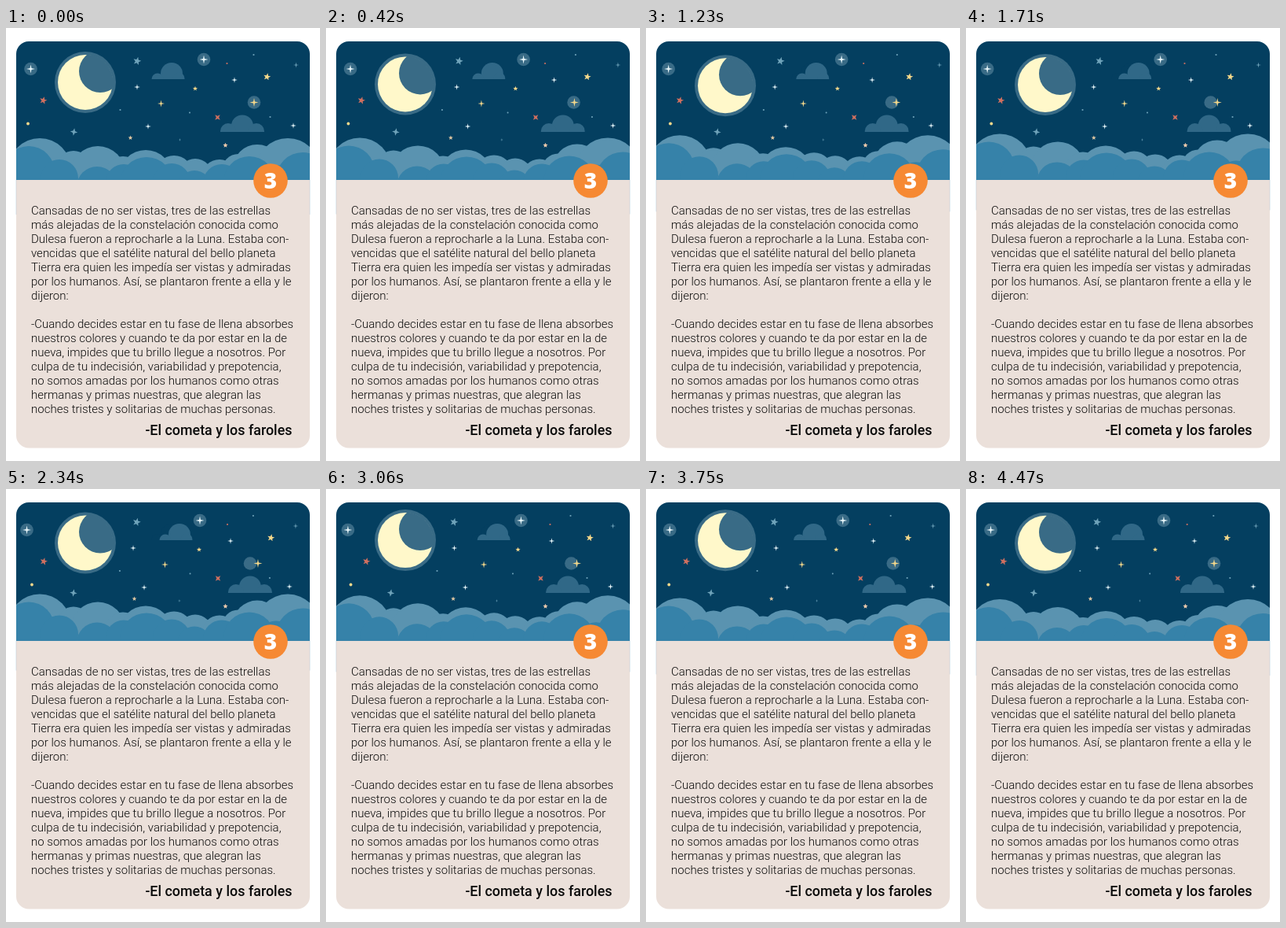
Recreate the animation shown at these times as an HTML page with a canvas. Size 400 by 550 pixels, loop 4.5 s.

```html
<!DOCTYPE html>
<html lang="es">
<head>
<meta charset="utf-8">
<style>
html, body { margin: 0; width: 100%; height: 100%; overflow: hidden; background: #fff; }
canvas { display: block; }
</style>
</head>
<body>
<canvas id="stage" width="400" height="550"></canvas>
<script>
const ctx = document.getElementById('stage').getContext('2d');
const LOOP = 4500, STEP = 30;
const SKY = '#043f60', PAPER = '#ebe0da', HALO = '#396b86', CLOUD = '#306887';
const BACK = '#5a93b0', FRONT = '#3682a9';
const WHITE = '#e4f4f8', GOLD = '#f6d98b', BLUE = '#6fa3ba', RED = '#cf6f5f';

const lines = [
  'Cansadas de no ser vistas, tres de las estrellas',
  'más alejadas de la constelación conocida como',
  'Dulesa fueron a reprocharle a la Luna. Estaba con-',
  'vencidas que el satélite natural del bello planeta',
  'Tierra era quien les impedía ser vistas y admiradas',
  'por los humanos. Así, se plantaron frente a ella y le',
  'dijeron:',
  '',
  '-Cuando decides estar en tu fase de llena absorbes',
  'nuestros colores y cuando te da por estar en la de',
  'nueva, impides que tu brillo llegue a nosotros. Por',
  'culpa de tu indecisión, variabilidad y prepotencia,',
  'no somos amadas por los humanos como otras',
  'hermanas y primas nuestras, que alegran las',
  'noches tristes y solitarias de muchas personas.'
];

function disc(x, y, r, color) {
  ctx.fillStyle = color;
  ctx.beginPath();
  ctx.arc(x, y, r, 0, Math.PI * 2);
  ctx.fill();
}

function star(x, y, r, color, points = 4, inner = 0.25, turn = 0) {
  ctx.fillStyle = color;
  ctx.beginPath();
  for (let i = 0; i < points * 2; i++) {
    const a = turn - Math.PI / 2 + i * Math.PI / points;
    const d = i % 2 ? r * inner : r;
    ctx.lineTo(x + d * Math.cos(a), y + d * Math.sin(a));
  }
  ctx.fill();
}

// Union of circles, cut flat at the base line.
function cloud(circles, left, right, base, color) {
  ctx.save();
  ctx.beginPath();
  ctx.rect(left, 0, right - left, base);
  ctx.clip();
  for (const [x, y, r] of circles) disc(x, y, r, color);
  ctx.restore();
}

function drawMoon(y) {
  disc(101, y, 39, HALO);
  disc(101, y, 35, '#fff8ca');
  ctx.save();
  ctx.beginPath();
  ctx.arc(101, y, 35.6, 0, Math.PI * 2);
  ctx.clip();
  disc(120, y - 14, 27, HALO);
  ctx.restore();
}

function drawStars(drift, sway) {
  for (const [x, y] of [[31.5, 52], [252, 40], [316, 94.5]]) disc(x - drift, y, 8.3, HALO);
  for (const [x, y] of [[31.5, 52], [252, 40]]) star(x - drift, y, 5.5, WHITE);
  for (const [x, y] of [[291, 66], [167, 75], [366, 124], [181, 125]])
    star(x - drift, y, 3.8, WHITE);
  star(279.5, 149, 3.3, '#ecc9ac', 5, 0.45);
  ctx.fillStyle = SKY;

  star(316 + drift, 94.5, 5.5, GOLD);
  star(197.5 + drift, 96, 4.5, GOLD);
  star(332.5 + drift, 62, 4.8, GOLD, 5, 0.42, 0.2);
  star(241 + drift, 77, 3.2, GOLD, 5, 0.42);
  star(158.5 + drift, 139.5, 3, '#dec6a1', 5, 0.45);
  disc(28 + drift, 121.5, 1.9, GOLD);

  star(167 + sway, 42, 5.3, BLUE, 5, 0.42, 0.25);
  star(86.5 + sway, 132, 4.8, BLUE, 4, 0.38, 0.15);
  star(369.5 + sway, 47, 3.5, BLUE);
  star(221.5 + sway, 142, 2, BLUE);
  for (const [x, y] of [[145.5, 104], [336.5, 113], [315.5, 34]]) disc(x + sway, y, 1.1, BLUE);

  star(47.5 - sway, 92, 5, RED, 5, 0.42, 0.25);
  star(269.5 - sway, 113.5, 4.5, RED, 4, 0.38, Math.PI / 4);
  disc(281.5 - sway, 45, 1.1, RED);
  disc(234 - sway, 107.5, 1, BLUE);
}

function drawHorizon(lift) {
  ctx.save();
  ctx.translate(0, -lift);
  cloud([[43, 180, 40], [86, 177, 21], [117, 185, 35], [149, 187, 24], [178, 189, 34],
    [214, 186, 24], [241, 188, 22], [272, 190, 23], [296, 181, 21], [320, 179, 31],
    [359, 181, 41]], 13, 387, 210, BACK);
  cloud([[29, 183, 33], [68, 191, 24], [116, 202, 26], [150, 196, 23], [179, 198, 34],
    [211, 196, 24], [240, 203, 22], [275, 197, 24], [310, 196, 33], [344, 198, 24],
    [378, 192, 34]], 13, 387, 210, FRONT);
  ctx.restore();
}

function drawText() {
  ctx.fillStyle = '#0b0b0b';
  ctx.textAlign = 'left';
  ctx.font = '300 15px Roboto, sans-serif';
  lines.forEach((line, i) => ctx.fillText(line, 32, 237 + i * 18));
  ctx.textAlign = 'right';
  ctx.font = '500 17.9px Roboto, sans-serif';
  ctx.fillText('-El cometa y los faroles', 364.5, 516.5);
  disc(337, 194, 21.8, '#f68933');
  ctx.fillStyle = '#fff';
  ctx.textAlign = 'center';
  ctx.font = '800 28px "Open Sans", sans-serif';
  ctx.fillText('3', 337, 204);
}

function draw(ms) {
  const phase = Math.floor(ms % LOOP / STEP) * STEP / LOOP * Math.PI * 2;
  const swing = (1 - Math.cos(phase)) / 2;
  const wave = Math.sin(phase);

  ctx.fillStyle = '#fff';
  ctx.fillRect(0, 0, 400, 550);
  ctx.save();
  ctx.beginPath();
  ctx.roundRect(13, 17, 374, 516.5, 16);
  ctx.clip();
  ctx.fillStyle = SKY;
  ctx.fillRect(13, 17, 374, 180);
  drawMoon(69 + 4.3 * wave);
  drawStars(5 * swing, 4.4 * wave);
  const shift = 10 * swing;
  cloud([[211, 58, 14], [193, 65, 8], [221, 65, 7]], 185 + 0, 240, 65, SKY);
  ctx.save();
  ctx.translate(shift, 0);
  cloud([[211, 58, 14], [193, 65, 7.5], [220, 64, 7.5]], 185, 228, 65, CLOUD);
  cloud([[301, 124.5, 14], [283, 131, 10], [319, 131, 10]], 272, 329, 132, CLOUD);
  ctx.restore();
  drawHorizon(6.5 * swing);
  ctx.fillStyle = PAPER;
  ctx.fillRect(13, 193, 374, 341);
  ctx.restore();

  // Hairline of the cloud layer beside the paper.
  ctx.fillStyle = 'rgba(54,130,169,.3)';
  ctx.fillRect(12.6, 193, 0.6, 44 - 6.5 * swing);
  ctx.fillRect(386.8, 193, 0.6, 44 - 6.5 * swing);
  drawText();
}

function tick() {
  draw(performance.now());
  requestAnimationFrame(tick);
}
tick();
</script>
</body>
</html>
```
